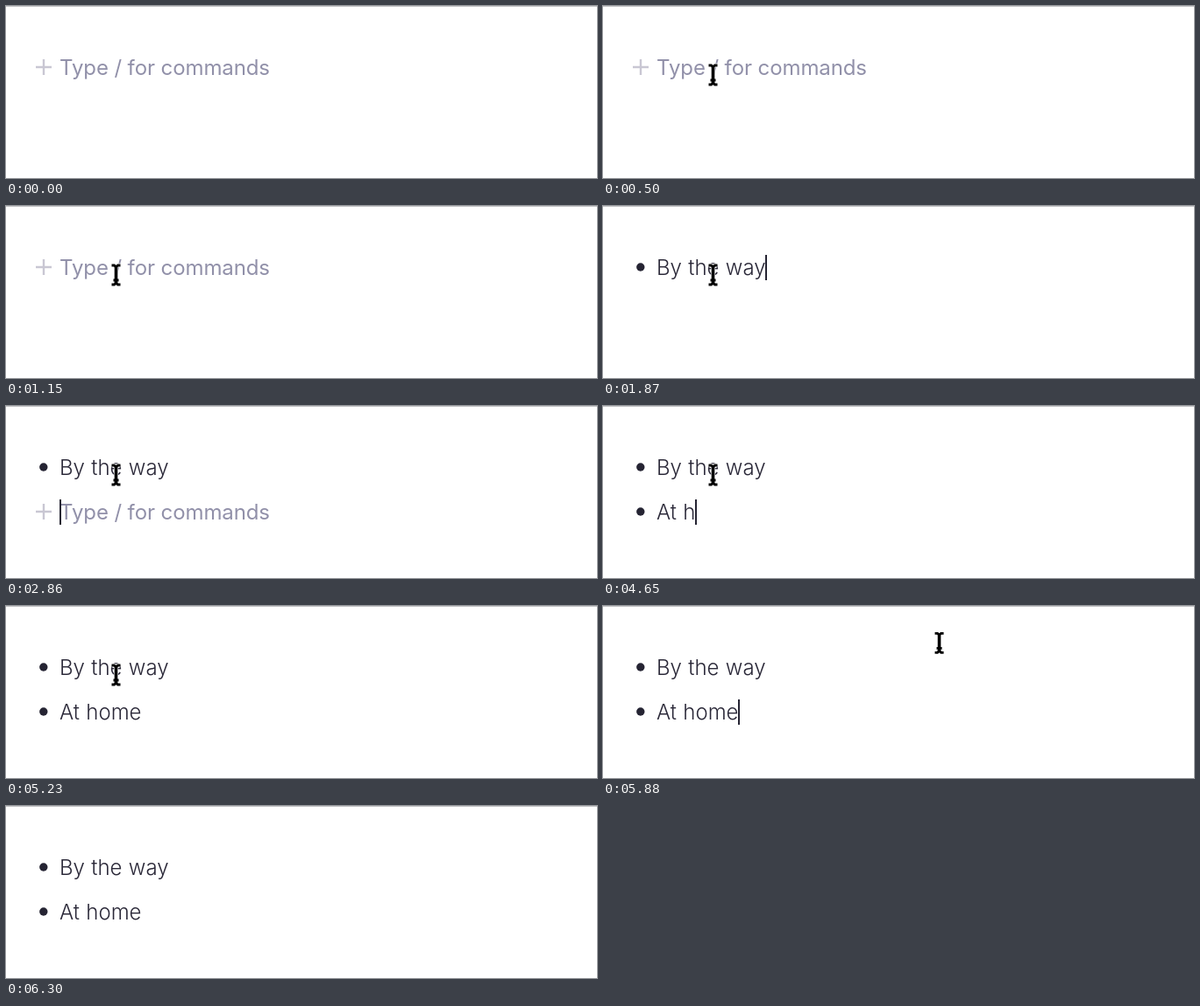
Write an HTML page that moves like this. It is 674 px wide and 197 px high and loops after 6390 ms.

```html
<!DOCTYPE html>
<html lang="en">
<head>
<meta charset="utf-8">
<title>List editor</title>
<style>
  html, body { margin: 0; width: 100%; height: 100%; overflow: hidden; background: #fff; }
  svg { display: block; }
  text { font: 24px Inter, sans-serif; white-space: pre; }
  .hint { fill: #9190a9; letter-spacing: -.1px; }
  .typed { fill: #2a2838; font-weight: 350; word-spacing: .6px; }
  .plus { stroke: #c9c7d3; stroke-width: 2.4; }
  .bullet, .caret { fill: #252433; }
</style>
</head>
<body>
<svg width="674" height="197" viewBox="0 0 674 197">
  <rect width="674" height="1" fill="#c4c4c6"/>
  <path id="hover" class="plus" d="M34 70h18M43 61v18"/>
  <g id="pointer" fill="none">
    <path id="beam" d="M-5-11h3l2 2 2-2h3M0-10V10M-5 11h3l2-2 2 2h3M-3 6h6" stroke="#fff" stroke-width="4.6"/>
    <path d="M-5-11h3l2 2 2-2h3M-5 11h3l2-2 2 2h3M-3 6h6" stroke="#000" stroke-width="2.8"/>
    <path d="M0-9V9" stroke="#000" stroke-width="3.6"/>
  </g>
</svg>
<script>
const LOOP = 6390;
const pointer = document.getElementById('pointer');
const hover = document.getElementById('hover');

// keys: [time, typed length]; carets: [on, off]
const rows = [
  { y: 0, from: 0, text: 'By the way',
    keys: [[1370, 1], [1440, 2], [1580, 5], [1650, 6], [1870, 10]],
    carets: [[570, 1150], [1370, 2430]] },
  { y: 51, from: 2860, text: 'At home',
    keys: [[4500, 1], [4650, 4], [4720, 7]],
    carets: [[2860, 3440], [3940, 5230], [5730, 6300]] },
];

for (const row of rows) {
  const g = document.createElementNS('http://www.w3.org/2000/svg', 'g');
  g.setAttribute('transform', `translate(0 ${row.y})`);
  g.innerHTML = `
    <path class="plus" d="M34 70h18M43 61v18"/>
    <circle class="bullet" cx="42.8" cy="70" r="4.7"/>
    <text class="hint" x="61" y="79">Type / for commands</text>
    <text class="typed" x="61" y="79"></text>
    <rect class="caret" y="56" width="2" height="29"/>`;
  pointer.before(g);
  row.g = g;
  [row.plus, row.bullet, row.hint, row.typed, row.caret] = g.children;
}

const show = (el, on) => { el.style.display = on ? '' : 'none'; };
const move = (el, x, y) => el.setAttribute('transform', `translate(${x} ${y})`);
const clamp = v => Math.min(1, Math.max(0, v));
const bezier = (a, b, c, u) => (1 - u) ** 2 * a + 2 * u * (1 - u) * b + u * u * c;

function drawRow(row, t) {
  let count = 0;
  for (const [time, n] of row.keys) if (t >= time) count = n;
  show(row.g, t >= row.from);
  show(row.plus, count < 2);
  show(row.bullet, count > 1);
  show(row.hint, !count);
  row.typed.textContent = row.text.slice(0, count);
  show(row.caret, row.carets.some(([on, off]) => t >= on && t < off));
  row.caret.setAttribute('x', 61 + (count ? Math.floor(row.typed.getComputedTextLength()) : 0));
}

// The pointer moves in 70 ms steps: in from below, out to the upper right.
// An empty row under it shows a plus.
function drawPointer(t) {
  const u = clamp((Math.floor(t / 70) - 1) / 6);
  const v = clamp(Math.floor((t - 5730) / 70) / 3);
  const e = 1 - (1 - u) ** 1.5;
  const x = bezier(251, 125, 125.5, e) + 387 * v;
  const y = bezier(168, 130, 79, e) - 55 * v;
  const visible = t >= 70 && t < 6020;
  show(pointer, visible);
  move(pointer, x, y);
  show(hover, visible && y > 96);
  move(hover, 0, y > 147 ? 102 : 51);
}

function frame() {
  const t = performance.now() % LOOP;
  rows.forEach(row => drawRow(row, t));
  drawPointer(t);
  requestAnimationFrame(frame);
}
frame();
</script>
</body>
</html>
```
